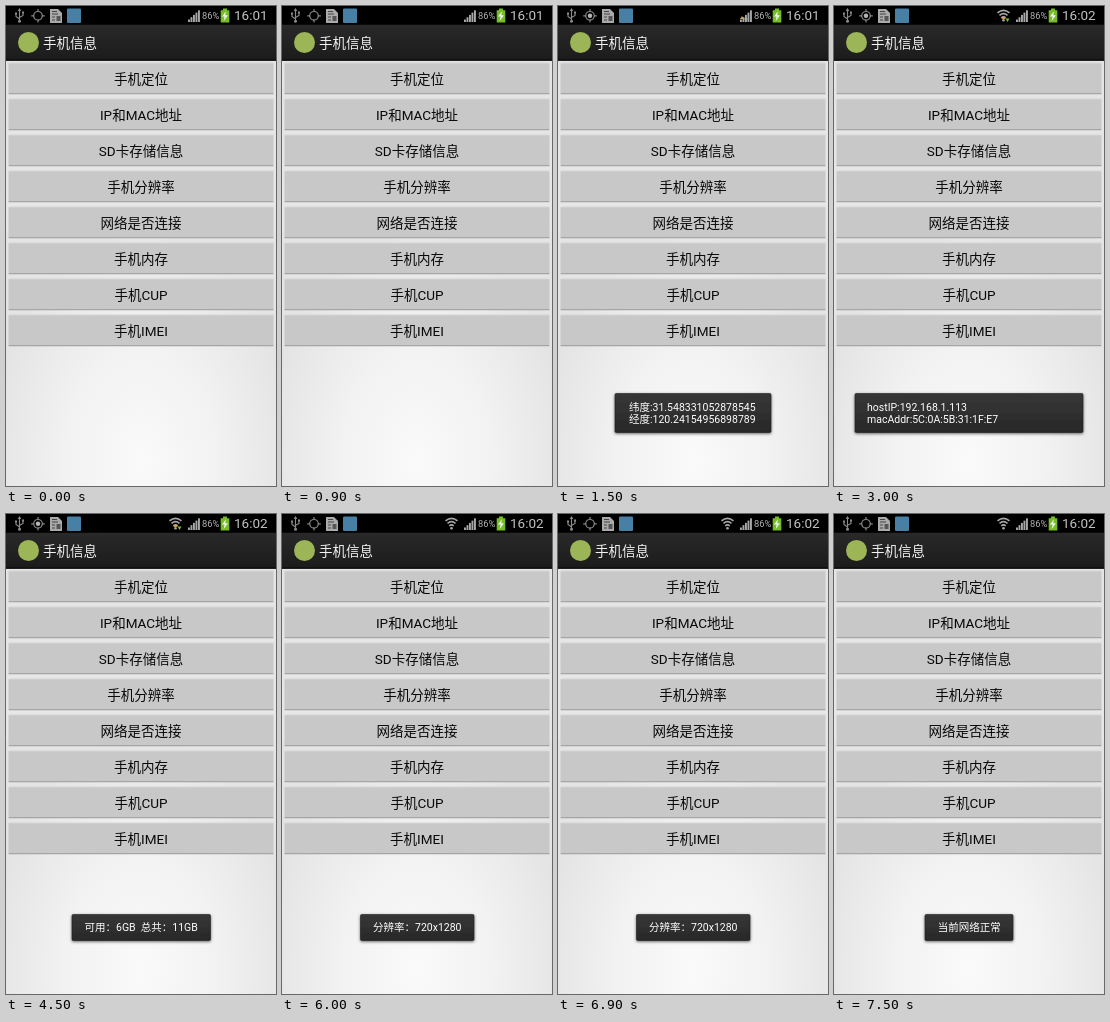
Recreate the animation shown at these times as an HTML page. Size 270 by 480 pixels, loop 8 s.

```html
<!DOCTYPE html>
<html lang="zh-CN">
<head>
<meta charset="utf-8">
<title>手机信息</title>
<style>
html, body { margin: 0; width: 100%; height: 100%; overflow: hidden; background: #000; }
svg { display: block; width: 100vw; height: 100vh; }
text { font-family: Roboto, "Noto Sans CJK SC", "Noto Sans CJK", sans-serif; white-space: pre; }
.label { font-size: 13.5px; fill: #080808; text-anchor: middle; }
.toast text { font-size: 10.5px; fill: #fff; }
.colon { font-family: "Noto Sans CJK TC", "Noto Sans CJK", sans-serif; }
</style>
</head>
<body>
<svg id="stage" viewBox="0 0 270 480" preserveAspectRatio="none">
  <defs>
    <linearGradient id="page" x2="0" y2="1">
      <stop stop-color="#e3e3e3"/><stop offset=".55" stop-color="#e8e8e8"/><stop offset="1" stop-color="#f3f3f3"/>
    </linearGradient>
    <radialGradient id="glow" gradientUnits="userSpaceOnUse" cx="0" cy="0" r="1" gradientTransform="translate(135 455) scale(150 230)">
      <stop stop-color="#fafafa"/><stop offset=".5" stop-color="#f2f2f2"/><stop offset="1" stop-color="#e4e4e4"/>
    </radialGradient>
    <linearGradient id="bar" x2="0" y2="1">
      <stop stop-color="#292929"/><stop offset="1" stop-color="#1b1b1b"/>
    </linearGradient>
    <linearGradient id="panel" x2="0" y2="1">
      <stop stop-color="#373737"/><stop offset="1" stop-color="#282828"/>
    </linearGradient>
    <filter id="shadow" x="-10%" y="-30%" width="120%" height="160%">
      <feDropShadow dx="0" dy="1" stdDeviation="1.4" flood-color="#000" flood-opacity=".6"/>
    </filter>
  </defs>

  <rect width="270" height="480" fill="url(#page)"/>
  <rect y="225" width="270" height="255" fill="url(#glow)"/>
  <g id="buttons"></g>

  <rect width="270" height="19" fill="#000"/>
  <rect y="18.75" width="270" height="36" fill="url(#bar)"/>
  <rect y="53.3" width="270" height="1.4" fill="#0d0d0d"/>
  <circle cx="22.5" cy="36.5" r="10.5" fill="#9cb556"/>
  <text x="37" y="42" font-size="13.5" fill="#f3f3f3">手机信息</text>

  <!-- USB -->
  <g fill="none" stroke="#8b8b8b" stroke-width="1.1">
    <path d="M13.5 4V15M13.5 13L10 10.5V8M13.5 11.5L17 9.5V7"/>
    <path d="M11.7 5L13.5 2L15.3 5Z" fill="#8b8b8b" stroke="none"/>
    <circle cx="13.5" cy="15.3" r="1.5" fill="#8b8b8b" stroke="none"/>
    <path d="M9 7.5h2M16 6.5h2" stroke-width="2"/>
  </g>
  <!-- GPS -->
  <g fill="none" stroke="#858585" stroke-width="1.2">
    <circle cx="32" cy="9.8" r="4.3"/>
    <path d="M32 3v3M32 13.6v3M25.2 9.8h3M35.8 9.8h3"/>
    <circle id="fix" cx="32" cy="9.8" r="2.2" fill="#b5b5b5" stroke="none"/>
  </g>
  <!-- Card -->
  <path d="M44 3h8l4 4v10H44Z" fill="#aaa"/>
  <path d="M46 5.5h5M46 8h6M46 11h3M46 14h3" stroke="#444" stroke-width="1.1"/>
  <rect x="50.5" y="10" width="4" height="5" fill="#555"/>
  <rect x="61" y="2.5" width="14" height="14.5" rx="1" fill="#487fa5"/>

  <g id="wifi" fill="none" stroke="#a8a8a8" stroke-width="1.6">
    <path d="M163.5 6.8Q169.5 1.8 175.5 6.8M165.5 9.3Q169.5 5.9 173.5 9.3M167.3 11.8Q169.5 9.8 171.7 11.8"/>
    <circle cx="169.5" cy="14.2" r="1.3" fill="#a8a8a8" stroke="none"/>
  </g>
  <g id="arrows">
    <path d="M0 13l2-3 2 3Z" fill="#e59a2c"/>
    <path d="M4 12.5h4l-2 3.5Z" fill="#72c531"/>
  </g>
  <g id="signal" fill="#a8a8a8"></g>
  <text x="196" y="13.3" font-size="9.3" fill="#b5b5b5">86%</text>
  <path d="M217 2.5h4v1.7h2.3v12.3h-8.6V4.2H217Z" fill="#75bd25"/>
  <path d="M220 5.3l-4 5.2h2.6l-1 4.7 4.3-6h-2.7Z" fill="#f4f4f4"/>
  <text id="clock" x="228" y="14.3" font-size="13.5" fill="#c2c2c2"></text>
  <g id="toasts"></g>
</svg>
<script>
const $ = id => document.getElementById(id);
const LOOP = 8000, STEP = 1500;
const labels = ["手机定位", "IP和MAC地址", "SD卡存储信息", "手机分辨率",
  "网络是否连接", "手机内存", "手机CUP", "手机IMEI"];

$("buttons").innerHTML = labels.map((label, i) => {
  const y = 54.75 + 36 * i;
  return `<rect x="2.5" y="${y + 2}" width="265" height="31.3" rx="1" fill="#c8c8c8"/>
    <rect x="3" y="${y + 2}" width="264" height=".8" fill="#d5d5d5"/>
    <rect x="2.5" y="${y + 32.2}" width="265" height="1.3" rx=".6" fill="#a5a5a5"/>
    <text class="label" x="135" y="${y + 23.4}">${label}</text>`;
}).join("");

$("signal").innerHTML = [0, 1, 2, 3, 4].map(i =>
  `<rect x="${182 + i * 2.5}" y="${13.5 - i * 2.3}" width="1.9" height="${2.5 + i * 2.3}"/>`).join("");

const states = [
  { clock: "16:01" },
  { clock: "16:01", fix: true, arrows: 182, x: 57, w: 156, textX: 71,
    lines: ["纬度:31.548331052878545", "经度:120.24154956898789"] },
  { clock: "16:02", fix: true, wifi: true, arrows: 167.5, x: 21, w: 228, textX: 33,
    lines: ["hostIP:192.168.1.113", "macAddr:5C:0A:5B:31:1F:E7"] },
  { clock: "16:02", fix: true, wifi: true, arrows: 167.5, x: 66, w: 138.5, textX: 78.5,
    lines: ["可用：6GB  总共：11GB"] },
  { clock: "16:02", wifi: true, x: 78.5, w: 113.5, textX: 91, lines: ["分辨率：720x1280"] },
  { clock: "16:02", wifi: true, x: 91, w: 88, textX: 103.7, lines: ["当前网络正常"] }
];

function toast({ x, w, textX, lines }) {
  if (!lines) return "";
  const top = lines.length > 1 ? 387.5 : 400.5;
  const rows = lines.map((line, i) => {
    const y = 417.3 - 12.6 * (lines.length - 1 - i);
    return `<text x="${textX}" y="${y}">${line.replace(/：/g, '<tspan class="colon">：</tspan>')}</text>`;
  }).join("");
  return `<g class="toast"><rect x="${x}" y="${top}" width="${w}" height="${426.5 - top}" rx="1.2"
    fill="url(#panel)" stroke="#202020" stroke-width=".6" filter="url(#shadow)"/>${rows}</g>`;
}

const show = (id, on) => $(id).setAttribute("visibility", on ? "visible" : "hidden");
let current = -1;

function render(now) {
  const index = Math.floor(now % LOOP / STEP);
  if (index !== current) {
    current = index;
    const state = states[index];
    $("clock").textContent = state.clock;
    show("fix", state.fix);
    show("wifi", state.wifi);
    show("arrows", state.arrows);
    $("arrows").setAttribute("transform", `translate(${state.arrows || 0} 0)`);
    $("toasts").innerHTML = toast(state);
  }
}

const start = performance.now();
function tick() {
  render(performance.now() - start);
  requestAnimationFrame(tick);
}
tick();
</script>
</body>
</html>
```
